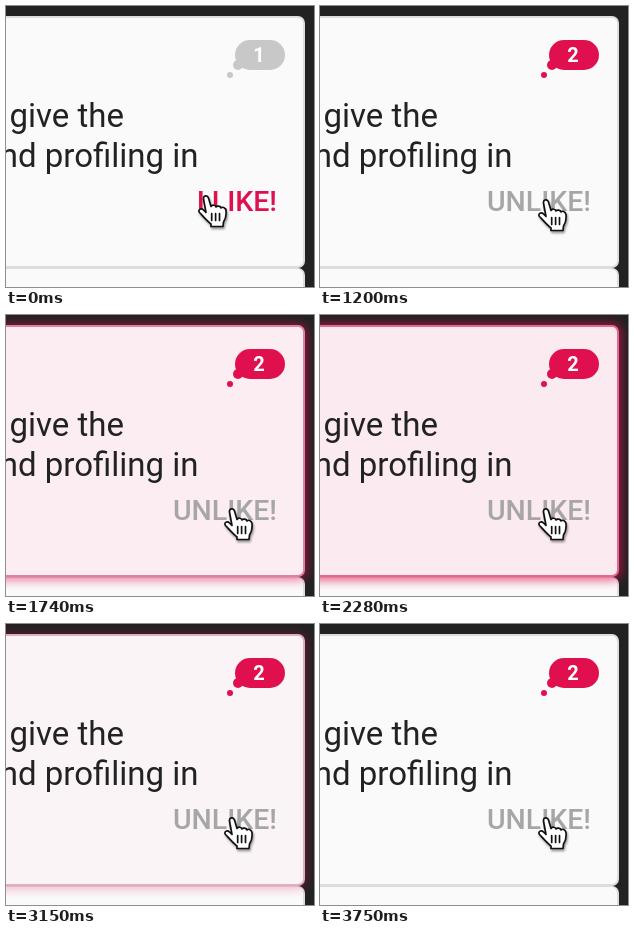
An HTML page for the animation above (4.75 s loop, 308 by 281 pixels).

```html
<!DOCTYPE html>
<html lang="en">
<head>
<meta charset="utf-8">
<style>
  html, body { margin: 0; width: 100%; height: 100%; overflow: hidden; background: #222; }
  #stage { position: relative; width: 100%; height: 100%; overflow: hidden; }
  .card {
    position: absolute; left: -40px; right: 9px; box-sizing: border-box;
    border: 2px solid #ddd; border-radius: 7px; background: #fafafa;
  }
  #top { top: 10px; height: 252px; z-index: 1; }
  #next { top: 262px; bottom: 0; border-width: 1px 2px 0 0; border-radius: 0 7px 0 0; }
  svg { position: absolute; left: 0; top: 0; z-index: 2; font-family: Roboto, sans-serif; }
  .body { font-size: 33px; fill: #222; }
  #button { font-size: 28.5px; font-weight: 500; text-anchor: end; }
  #count { font-size: 20px; font-weight: 700; text-anchor: middle; fill: #fff; }
  #hand { filter: drop-shadow(1px 2px 1px rgba(0, 0, 0, .4)); }
</style>
</head>
<body>
<div id="stage">
  <div class="card" id="top"></div>
  <div class="card" id="next"></div>
  <svg width="308" height="281">
    <g id="badge">
      <rect x="229" y="34" width="50" height="30" rx="15"/>
      <circle cx="232" cy="59" r="5"/>
      <circle cx="224" cy="69" r="3"/>
    </g>
    <text id="count" x="253" y="56"></text>
    <text class="body" x="3.5" y="120.5">give the</text>
    <text class="body" x="192.5" y="160.5" text-anchor="end">nd profiling in</text>
    <text id="button" x="271" y="204.5"></text>
    <g id="hand" stroke="#111" stroke-width="1.7" stroke-linejoin="round" stroke-linecap="round">
      <path fill="#fff" d="M7.5 6C7 2.5 11.5 1.5 12.5 5L15 13.5C16 11.5 19.5 12 20 14C21 12.5 24.5 13 25 15C26 13.5 29.5 14.5 30 17.5C30.5 22 29.5 26 27.5 29L27 33.5H15V31C11 28 6 22 3.5 19.5C1.5 17 5 14.5 7.5 17L10 19.5Z"/>
      <path fill="none" d="M15.7 20.5v7M19.6 20.5v7M23.5 20.5v7"/>
    </g>
  </svg>
</div>
<script>
const LOOP = 4750, CLICK = 900;
const PINK = [224, 16, 78], GREY = [200, 200, 200];
const $ = id => document.getElementById(id);
const card = $('top'), badge = $('badge'), count = $('count'), button = $('button'), hand = $('hand');

const span = (t, a, b) => Math.min(1, Math.max(0, (t - a) / (b - a)));
const mix = (a, b, k) => `rgb(${a.map((v, i) => Math.round(v + (b[i] - v) * k))})`;
const smooth = p => p * p * (3 - 2 * p);

// cubic-bezier(.25, .1, .25, 1)
function ease(x) {
  const curve = (a, b, s) => 3 * a * s * (1 - s) ** 2 + 3 * b * s * s * (1 - s) + s ** 3;
  let lo = 0, hi = 1;
  for (let i = 0; i < 20; i++) {
    const mid = (lo + hi) / 2;
    if (curve(.25, .25, mid) < x) lo = mid; else hi = mid;
  }
  return curve(.1, 1, hi);
}

function draw(t) {
  const liked = t >= CLICK;
  button.textContent = liked ? 'UNLIKE!' : 'I LIKE!';
  button.setAttribute('fill', liked ? '#a6a6a6' : `rgb(${PINK})`);
  count.textContent = liked ? 2 : 1;
  badge.setAttribute('fill', mix(GREY, PINK, ease(span(t, CLICK, 1180))));

  // the pointer slides right, slightly too far, then settles
  const x = 190 + 30 * smooth(span(t, 130, 450)) - 4 * smooth(span(t, 450, 610));
  const y = 187 + 4 * smooth(span(t, 130, 610));
  hand.setAttribute('transform', `translate(${x} ${y})`);

  const glow = ease(span(t, 1350, 2130)) - ease(span(t, 2830, 3750));
  card.style.background = mix([250, 250, 250], [251, 234, 239], glow);
  card.style.borderColor = mix([221, 221, 221], [228, 105, 145], glow);
  card.style.boxShadow = `0 1px 10px 3px rgba(${PINK}, ${.6 * glow})`;
}

function tick() {
  draw(performance.now() % LOOP);
  requestAnimationFrame(tick);
}
tick();
</script>
</body>
</html>
```
